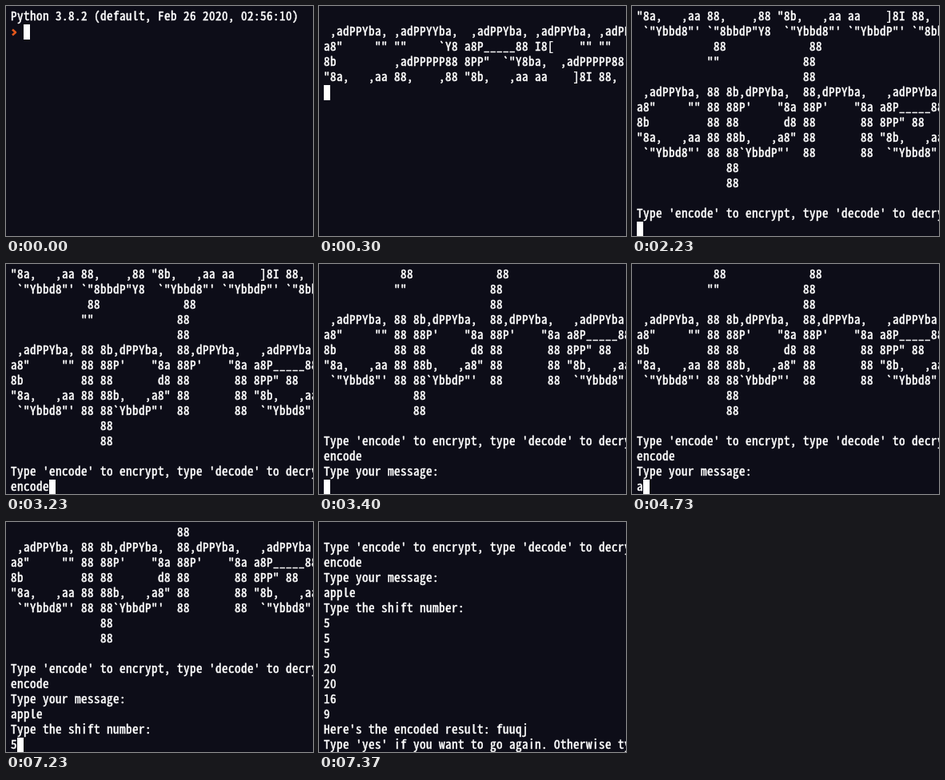
These frames come from a looping animation (384 px wide and 288 px high, 8000 ms). An HTML page with a canvas:

```html
<!DOCTYPE html>
<html lang="en">
<head>
<meta charset="utf-8">
<title>Caesar cipher terminal</title>
<style>
  html, body { margin: 0; width: 100%; height: 100%; overflow: hidden; background: #0d0d18; }
  canvas { display: block; }
</style>
</head>
<body>
<canvas id="stage" width="384" height="288"></canvas>

<script type="text/plain" id="banner">
 ,adPPYba, ,adPPYYba,  ,adPPYba, ,adPPYba, ,adPPYYba, 8b,dPPYba,
a8"     "" ""     `Y8 a8P_____88 I8[    "" ""     `Y8 88P'   "Y8
8b         ,adPPPPP88 8PP"  `"Y8ba,  ,adPPPPP88 88
"8a,   ,aa 88,    ,88 "8b,   ,aa aa    ]8I 88,    ,88 88
 `"Ybbd8"' `"8bbdP"Y8  `"Ybbd8"' `"YbbdP"' `"8bbdP"Y8 88
            88             88
           ""             88
                          88
 ,adPPYba, 88 8b,dPPYba,  88,dPPYba,   ,adPPYba, 8b,dPPYba,
a8"     "" 88 88P'    "8a 88P'    "8a a8P_____88 88P'   "Y8
8b         88 88       d8 88       88 8PP" 88
"8a,   ,aa 88 88b,   ,a8" 88       88 "8b,   ,aa 88
 `"Ybbd8"' 88 88`YbbdP"'  88       88  `"Ybbd8"' 88
              88
              88

Type 'encode' to encrypt, type 'decode' to decrypt:
</script>

<script>
const ctx = document.getElementById('stage').getContext('2d');
const LOOP = 8000, ROWS = 15, CELL_W = 8, CELL_H = 19, LEFT = 6, TOP = 4, BASELINE = 14;
const BACKGROUND = '#0d0d18';

// Tall, narrow glyphs spaced on the terminal's character grid
ctx.font = '500 15px "Noto Sans Mono CJK SC", "Noto Sans Mono CJK JP", "Noto Sans Mono", monospace';
ctx.letterSpacing = `${CELL_W - ctx.measureText('0').width}px`;
ctx.lineJoin = 'round';

const bannerLines = document.getElementById('banner').textContent.split('\n');
const firstPart = bannerLines.slice(0, 5).join('\n') + '\n';
const secondPart = bannerLines.slice(5).join('\n');

// Terminal output and key presses: [time in ms, appended text]
const session = [
  [300, firstPart],
  [330, secondPart],
  [2370, 'e'], [2470, 'n'], [2830, 'c'], [3030, 'o'], [3170, 'd'], [3230, 'e'],
  [3400, '\nType your message:\n'],
  [4730, 'a'], [4930, 'p'], [5070, 'p'], [5270, 'l'], [5400, 'e'],
  [5730, '\nType the shift number:\n'],
  [7230, '5'],
  [7370, "\n5\n5\n20\n20\n16\n9\nHere's the encoded result: fuuqj\n" +
         "Type 'yes' if you want to go again. Otherwise type 'no'. "],
];

const arrow = new Path2D('M0 0V14L3.2 11.2L5.5 16.6L7.6 15.7L5.4 10.4H9.6Z');
const chevron = new Path2D('M8 29.5L12 33L8 36.5');

function drawTerminal(text) {
  const lines = text.split('\n').slice(-ROWS);
  ctx.fillStyle = ctx.strokeStyle = '#fff';
  ctx.lineWidth = 0.5;
  lines.forEach((line, row) => {
    const y = TOP + BASELINE + row * CELL_H;
    ctx.fillText(line, LEFT, y);
    ctx.strokeText(line, LEFT, y);
  });
  const row = lines.length - 1;
  ctx.fillRect(LEFT + lines[row].length * CELL_W, TOP + row * CELL_H, CELL_W, CELL_H);
}

function drawPrompt() {
  ctx.strokeStyle = '#e2571c';
  ctx.lineWidth = 2.6;
  ctx.stroke(chevron);
}

function drawPointer(t) {
  const step = Math.min(7, Math.floor((t - 1430) / 33.3));
  const eased = 1 - (1 - step / 7) ** 2;
  ctx.save();
  ctx.translate(286.5 - 46 * eased, 137.5 * eased);
  ctx.fillStyle = '#101014';
  ctx.strokeStyle = '#e8e8ec';
  ctx.lineWidth = 1.2;
  ctx.fill(arrow);
  ctx.stroke(arrow);
  ctx.restore();
}

function draw(t) {
  ctx.fillStyle = BACKGROUND;
  ctx.fillRect(0, 0, 384, 288);
  if (t < 30) {
    drawTerminal('Python 3.8.2 (default, Feb 26 2020, 02:56:10)\n  ');
    drawPrompt();
  } else {
    drawTerminal(session.filter(([time]) => time <= t).map(([, text]) => text).join(''));
  }
  if (t >= 1430 && t < 2230) drawPointer(t);
}

function tick() {
  draw(Math.floor(performance.now() % LOOP / 10) * 10);
  requestAnimationFrame(tick);
}
tick();
</script>
</body>
</html>
```
